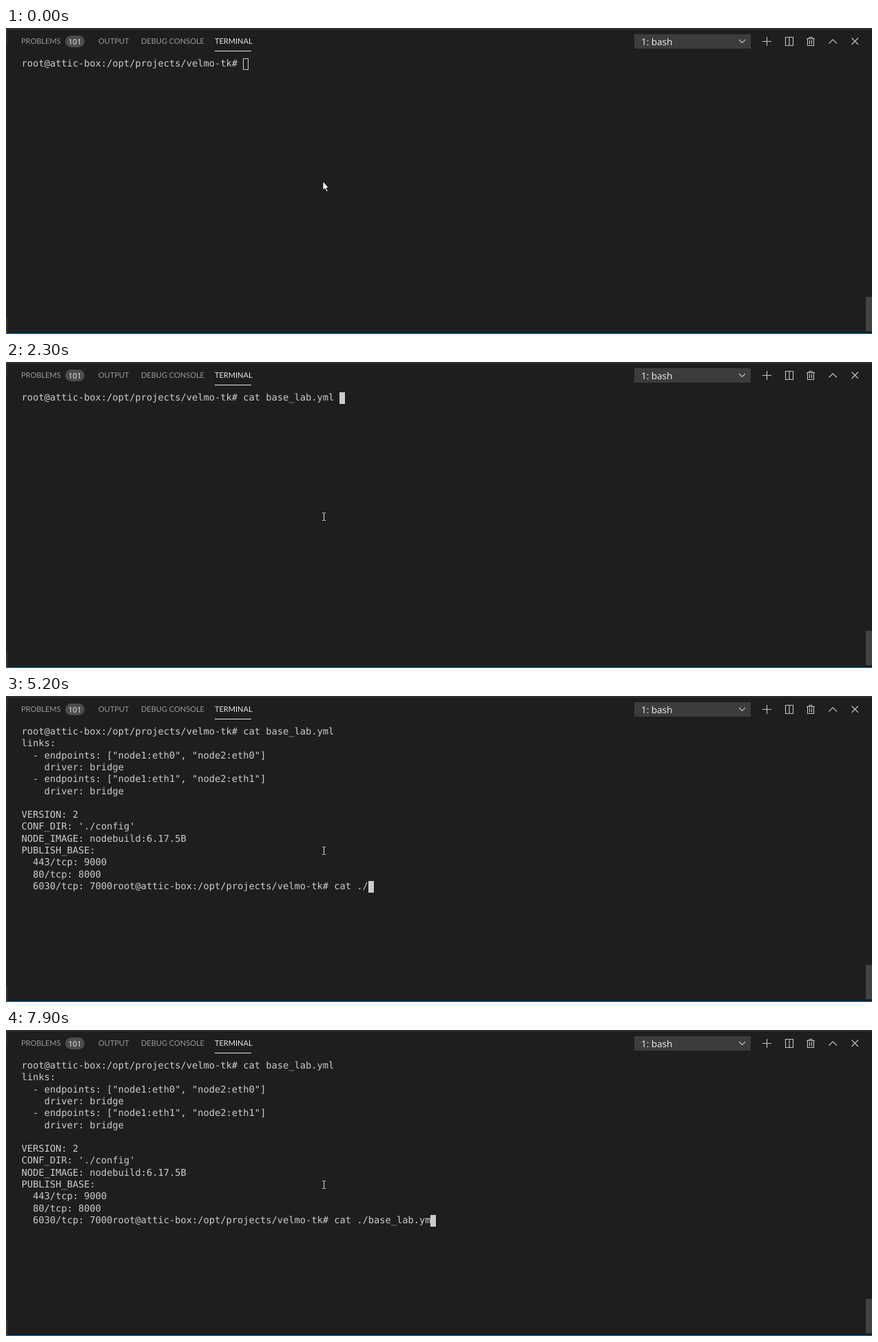
An HTML page that plays this animation: 1257 by 445 pixels, repeating every 8 s.

```html
<!DOCTYPE html>
<html lang="en">
<head>
<meta charset="utf-8">
<title>Terminal session</title>
<style>
  html, body { margin: 0; width: 100%; height: 100%; overflow: hidden; background: #1e1e1e; }
  svg { display: block; }
  text { text-rendering: geometricPrecision; white-space: pre; }
  .tab { font: 11px Lato, "Open Sans", sans-serif; fill: #999; }
  .on { fill: #e7e7e7; }
  .badge { font: 11px "Open Sans", sans-serif; fill: #f2f2f2; text-anchor: middle; }
  .pick { font: 13.5px "Open Sans", "Noto Sans", sans-serif; fill: #f0f0f0; }
  .icon { fill: none; stroke: #c5c5c5; stroke-width: 1.1; }
  #screen { font: 13.714px "DejaVu Sans Mono", monospace; fill: #ccc; }
</style>
</head>
<body>
<svg width="1257" height="445" viewBox="0 0 1257 445">
  <rect width="1257" height="445" fill="#1e1e1e"/>
  <rect width="2" height="445" fill="#252526"/>
  <rect width="2" height="23" fill="#303031"/>
  <rect y="422" width="2" height="22" fill="#38383a"/>
  <rect x="2" y="1" width="1255" height="1" fill="#414141"/>
  <rect y="444" width="1257" height="1" fill="#0a74b8"/>
  <rect x="1248" y="391" width="9" height="50" fill="#434343"/>

  <text class="tab" x="22" y="23">PROBLEMS</text>
  <rect x="86" y="11" width="28" height="17" rx="8.5" fill="#4d4d4d"/>
  <text class="badge" x="100" y="23.5">101</text>
  <text class="tab" x="134" y="23">OUTPUT</text>
  <text class="tab" x="196" y="23">DEBUG CONSOLE</text>
  <text class="tab on" x="303" y="23">TERMINAL</text>
  <rect x="303" y="33" width="53" height="1" fill="#e7e7e7"/>

  <rect x="912" y="9" width="169" height="21" fill="#3c3c3c"/>
  <text class="pick" x="922" y="24.5">1: bash</text>
  <g class="icon">
    <path d="M1064 17l4.5 4.5L1073 17"/>
    <path d="M1098 19.5h13M1104.5 13v13"/>
    <path d="M1131.5 13.5h11v12h-11zM1137 13.5v12"/>
    <path d="M1162 15.5h12M1166 15.5v-2h4v2M1163.5 15.5v10h9v-10M1166.5 17.5v6M1169.5 17.5v6"/>
    <path d="M1194.5 22.5l5.7-5.7 5.7 5.7"/>
    <path d="M1227.5 14.5l9.5 9.5M1237 14.5l-9.5 9.5"/>
  </g>

  <g id="screen"></g>
  <rect id="caret"/>
  <path id="arrow" d="M460 223v13l3-2.7 2.2 4.6 2-1-2.2-4.4h3.6z" fill="#fff" stroke="#000" stroke-width=".8"/>
  <path id="beam" d="M459 219.5h1.5l1 .8 1-.8h1.5M461.5 220v10M459 230.5h1.5l1-.8 1 .8h1.5" fill="none" stroke="#e4e4e4"/>
</svg>
<script>
const LOOP = 8000, LEFT = 22.5, CELL = 8.256, TOP = 56, LINE = 17.3;
const PROMPT = "root@attic-box:/opt/projects/velmo-tk# ";
const FILE = [
  "links:",
  '  - endpoints: ["node1:eth0", "node2:eth0"]',
  "    driver: bridge",
  '  - endpoints: ["node1:eth1", "node2:eth1"]',
  "    driver: bridge",
  "",
  "VERSION: 2",
  "CONF_DIR: './config'",
  "NODE_IMAGE: nodebuild:6.17.5B",
  "PUBLISH_BASE:",
  "  443/tcp: 9000",
  "  80/tcp: 8000",
  "  6030/tcp: 7000"
];
const FIRST = "cat base_lab.yml ", SECOND = "cat ./base_lab.yml ";
const ENTER = 2800, FOCUS = 600, HOVER = 200;

// [time, number of characters on the command line]
const TYPED = [[0, 0], [1200, 1], [1400, 2], [1600, 3], [1800, 4], [1900, 6], [2100, 8], [2300, 17]];
const TYPED_AGAIN = [[ENTER, 0], [3400, 1], [3500, 2], [3600, 3], [4200, 4], [4700, 5], [5200, 6],
  [5700, 7], [5900, 8], [6000, 9], [6100, 10], [6500, 19], [7500, 18], [7900, 17]];

const $ = id => document.getElementById(id);
const set = (el, attrs) => { for (const k in attrs) el.setAttribute(k, attrs[k]); };
const stepAt = (steps, t) => steps.filter(s => s[0] <= t).pop()[1];

const rows = [PROMPT, ...FILE].map((_, i) => {
  const row = document.createElementNS("http://www.w3.org/2000/svg", "text");
  set(row, { x: LEFT, y: TOP + i * LINE });
  return $("screen").appendChild(row);
});

function linesAt(t) {
  if (t < ENTER) return [PROMPT + FIRST.slice(0, stepAt(TYPED, t))];
  const lines = [PROMPT + FIRST, ...FILE];
  lines[lines.length - 1] += PROMPT + SECOND.slice(0, stepAt(TYPED_AGAIN, t));
  return lines;
}

function draw(t) {
  const lines = linesAt(t), last = lines.length - 1;
  rows.forEach((row, i) => {
    const line = lines[i] || "";
    if (row.textContent !== line) row.textContent = line;
  });
  const x = Math.round(LEFT + lines[last].length * CELL - 0.5);
  const y = Math.round(44 + last * LINE);
  if (t < FOCUS) set($("caret"), { x: x + .5, y: y + .5, width: 7, height: 16, fill: "none", stroke: "#ccc" });
  else set($("caret"), { x, y, width: 8, height: 17, fill: "#ccc", stroke: "none" });
  $("arrow").style.display = t < HOVER ? "" : "none";
  $("beam").style.display = t < HOVER ? "none" : "";
}

function tick() {
  draw(performance.now() % LOOP);
  requestAnimationFrame(tick);
}
tick();
</script>
</body>
</html>
```
